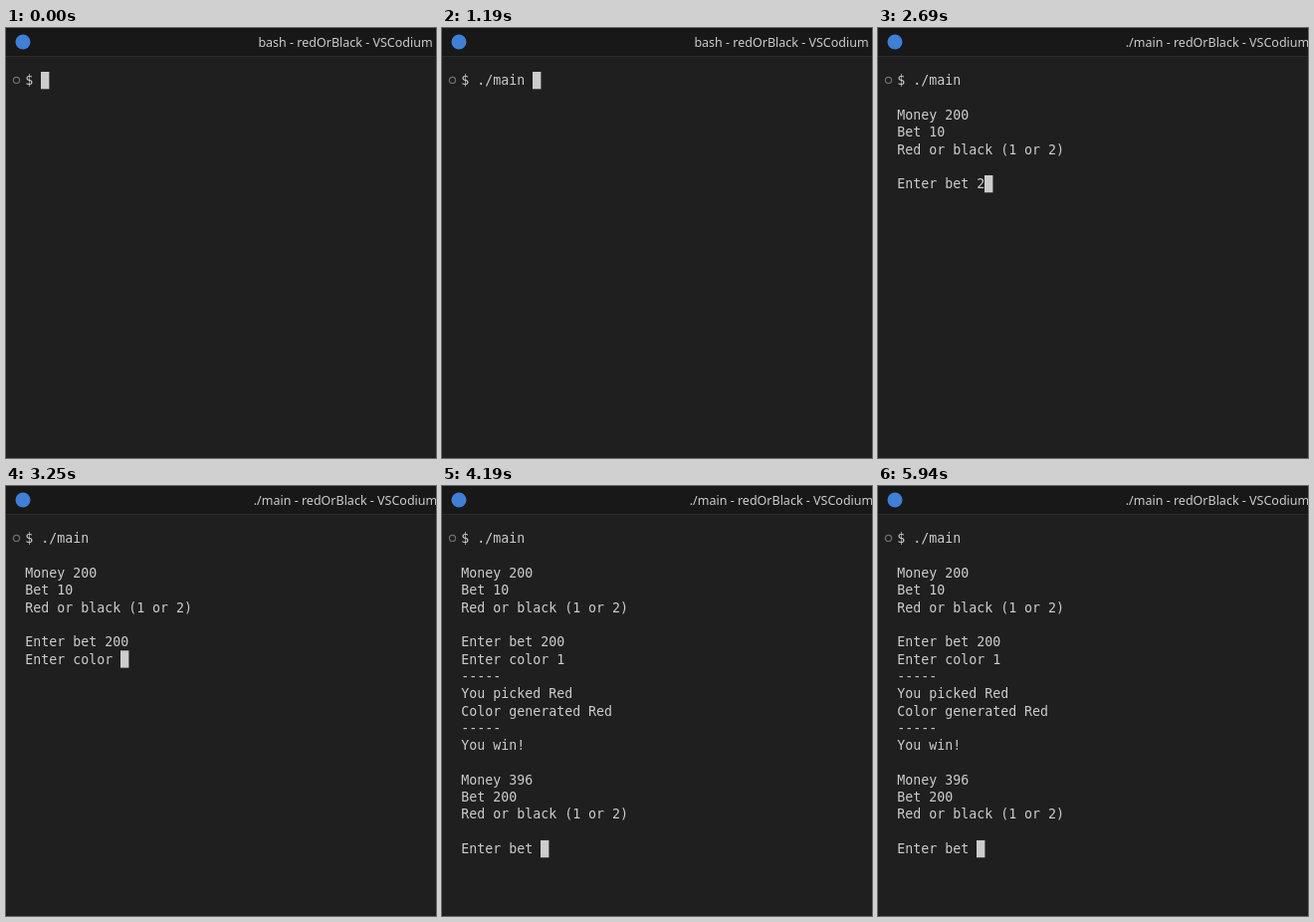
An HTML page for the animation above (6000 ms loop, 432 by 432 pixels).

```html
<!DOCTYPE html>
<html lang="en">
<head>
<meta charset="utf-8">
<title>Terminal session</title>
<style>
  html, body { margin: 0; width: 100%; height: 100%; overflow: hidden; background: #1f1f1f; }
  svg { display: block; width: 100%; height: 100%; }
  text { fill: #cccccc; white-space: pre; }
  .title { font: 12.5px "Noto Sans", sans-serif; text-anchor: middle; }
  .line { font: 13.29px "DejaVu Sans Mono", monospace; }
</style>
</head>
<body>
<svg viewBox="0 0 432 432">
  <rect width="432" height="432" fill="#1f1f1f"/>
  <rect width="432" height="28" fill="#181818"/>
  <rect y="28" width="432" height="1" fill="#2b2b2b"/>
  <circle cx="17" cy="14" r="7.5" fill="#3f7fd6"/>
  <text class="title" x="341" y="18.5"></text>
  <circle cx="10.5" cy="52.4" r="3.1" fill="none" stroke="#6e6e6e" stroke-width="1.2"/>
  <g id="screen"></g>
  <rect id="cursor" width="8.4" height="17.3" fill="#cccccc"/>
</svg>
<script>
const LOOP = 6000, ROWS = 19;
const LEFT = 19.2, TOP = 44, CELL_W = 8, CELL_H = 17.33, BASELINE = 13.2;

// Everything the terminal prints, in order: [time, text]
const output = [
  [0, "$ "],
  [190, "."],
  [380, "/"],
  [630, "m"],
  [750, "a"],
  [880, "in "],
  [1560, "\n\nMoney 200\nBet 10\nRed or black (1 or 2)\n\nEnter bet "],
  [2690, "2"],
  [2810, "0"],
  [2940, "0"],
  [3250, "\nEnter color "],
  [3750, "1"],
  [4190, "\n-----\nYou picked Red\nColor generated Red\n-----\nYou win!\n\n" +
         "Money 396\nBet 200\nRed or black (1 or 2)\n\nEnter bet "]
];

const screen = document.getElementById("screen");
const cursor = document.getElementById("cursor");
const title = document.querySelector(".title");

const rows = Array.from({ length: ROWS }, (_, i) => {
  const row = document.createElementNS("http://www.w3.org/2000/svg", "text");
  row.setAttribute("class", "line");
  row.setAttribute("x", LEFT);
  row.setAttribute("y", TOP + i * CELL_H + BASELINE);
  return screen.appendChild(row);
});

function setText(node, text) {
  if (node.textContent !== text) node.textContent = text;
}

function render(t) {
  const printed = output.filter(([at]) => at <= t).map(([, text]) => text).join("");
  const lines = printed.split("\n");
  const last = lines.length - 1;
  rows.forEach((row, i) => setText(row, lines[i] || ""));
  cursor.setAttribute("x", LEFT - 0.2 + lines[last].length * CELL_W);
  cursor.setAttribute("y", TOP + last * CELL_H);
  setText(title, (t < 1750 ? "bash" : "./main") + " - redOrBlack - VSCodium");
}

const start = performance.now();
function tick() {
  render((performance.now() - start) % LOOP);
  requestAnimationFrame(tick);
}
tick();
</script>
</body>
</html>
```
